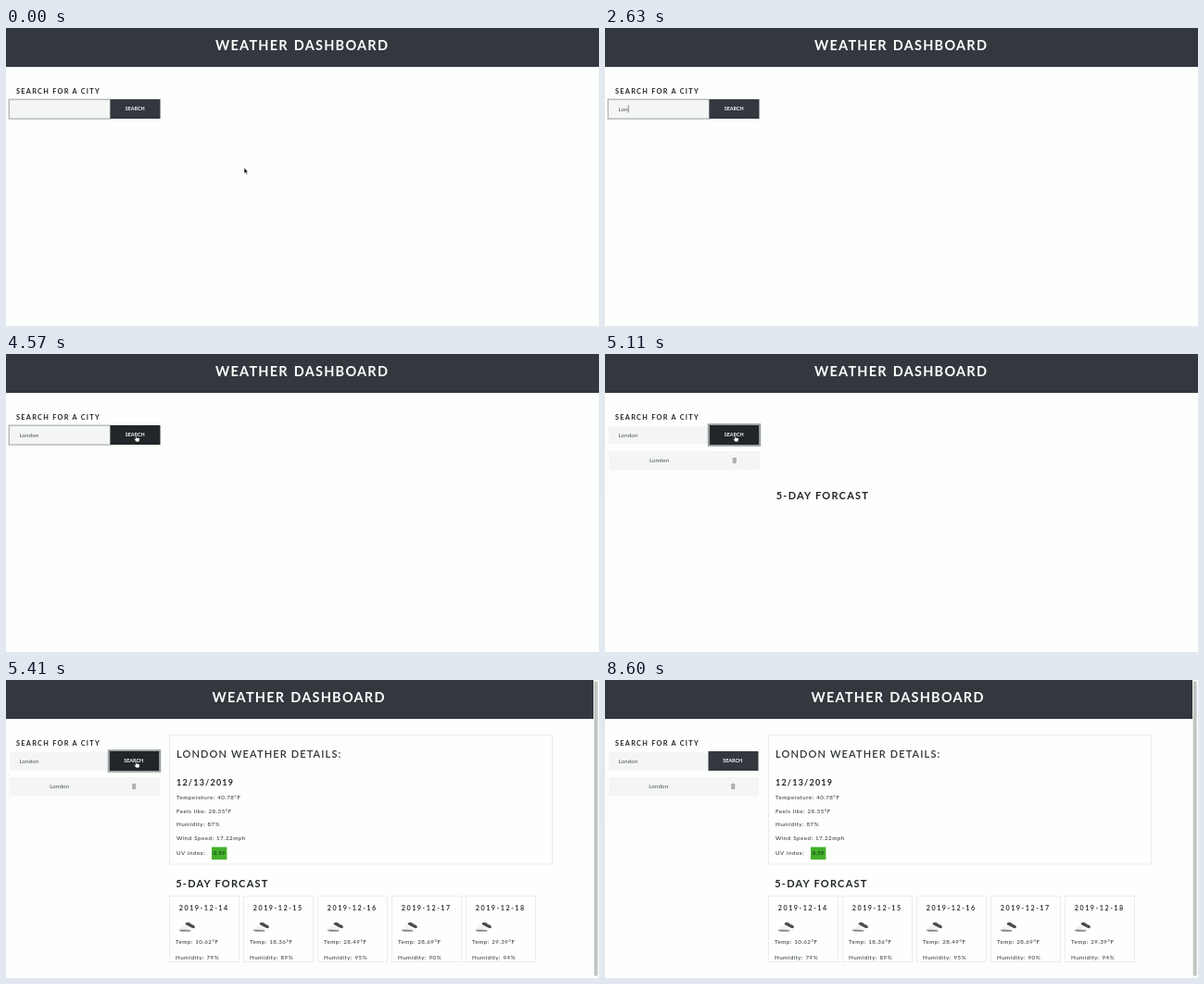
Recreate the animation shown at these times as an HTML page. Size 640 by 322 pixels, loop 9.05 s.

```html
<!DOCTYPE html>
<html lang="en">
<head>
<meta charset="utf-8">
<title>Weather dashboard</title>
<style>
  html, body { margin: 0; width: 100%; height: 100%; overflow: hidden; background: #fdfffc; }
  svg { display: block; width: 100vw; height: 100vh; font-family: Lato, "Open Sans", sans-serif; }
</style>
</head>
<body>
<svg id="stage" viewBox="0 0 640 322"></svg>
<script>
const LOOP = 9050;
const RESULTS = 5110, DETAILS = 5260, COMPLETE = 5410, HOVER = 4450, BLUR = 8420;
const CITY = "London";
const KEY_TIMES = [1570, 1950, 2280, 2770, 2910, 3040];
const CARET_ON = [[550, 840], [1060, 3400], [3900, 4190]];
const POINTER = [
  [0, "arrow", 257, 151], [290, "arrow", 120, 112], [420, "beam", 28.5, 84], [700, "none"],
  [4190, "arrow", 194, 107], [4320, "arrow", 172, 99], [4450, "hand", 144, 89],
  [4570, "hand", 138, 87.3], [6710, "hand", 138.5, 89.5], [6860, "arrow", 314, 56],
  [7000, "arrow", 539.7, -1], [8600, "none"]
];
const FORECAST = [["10.62", 79], ["18.36", 89], ["28.49", 95], ["28.69", 90], ["29.39", 94]];

const STYLES = {
  title:    { size: 14.5, spacing: 1.25, words: 1, weight: 700, fill: "#fff" },
  label:    { size: 7.3, spacing: 1.29, weight: 700, fill: "#212529" },
  button:   { size: 5.4, spacing: 0, weight: 700, fill: "#fff" },
  field:    { size: 6.2, spacing: 0.12, weight: 400, fill: "#495057" },
  heading:  { size: 11, spacing: 1.14, weight: 600, fill: "#303438" },
  forecast: { size: 11, spacing: 1.24, weight: 700, fill: "#212529" },
  date:     { size: 9, spacing: 1.2, weight: 700, fill: "#212529" },
  day:      { size: 7.2, spacing: 1.52, weight: 700, fill: "#33373b" },
  body:     { size: 6.2, spacing: 0.47, words: 0.5, weight: 500, fill: "#3a3e42" },
  badge:    { size: 6, spacing: 0.3, weight: 500, fill: "#14301a" }
};

const SHAPES = {
  none: "",
  arrow: `<path d="M0 0V6.2L1.5 4.9L2.5 7.3L3.6 6.8L2.6 4.5H4.4Z" fill="#111" stroke="#fff" stroke-width=".5"/>`,
  beam: `<path d="M0 .5Q1 .5 1 1.5V9.5Q1 10.5 0 10.5M2 .5Q1 .5 1 1.5M2 10.5Q1 10.5 1 9.5" fill="none" stroke="#555" stroke-width=".6"/>`,
  hand: `<path d="M1.7 4.8V1Q2.2 0 2.8 1V3L5.5 3.5Q6.5 3.8 6.3 5L5.6 7.6H2.5L.3 5Q.3 4 1.7 4.8Z" fill="#fff" stroke="#111" stroke-width=".55"/>`,
  trash: `<path d="M-2.2-2H2.2M-.8-2.2V-2.8H.8V-2.2M-1.6-1.8L-1.4 2.4H1.4L1.6-1.8M-.5-1V1.6M.5-1V1.6" fill="none" stroke="#555" stroke-width=".5"/>`,
  clouds: `<path d="M7.5 3Q7.5 .8 10 1.2Q12.5 .8 14 3Q17.5 3.6 17.8 6Q17.5 7.8 15 7.2L11 5.2Z" fill="#4c4c4c"/>
    <path d="M0 9.4Q0 7 3 7Q4 4 7 4.8Q10 4.2 11 6.6Q14 7.2 13.6 9.4Z" fill="#f1f1f1"/>
    <path d="M.3 9.2Q6 8.2 13.8 9.6L12.5 10.9H3Z" fill="#868686"/>`
};

const place = (name, x, y) => `<g transform="translate(${x} ${y})">${SHAPES[name]}</g>`;
const rect = (x, y, w, h, fill, extra = "") =>
  `<rect x="${x}" y="${y}" width="${w}" height="${h}" fill="${fill}" ${extra}/>`;
const outline = (x, y, w, h, color = "#e9ecea", width = 0.9) =>
  rect(x, y, w, h, "none", `stroke="${color}" stroke-width="${width}"`);

function text(style, x, y, content, id = "") {
  const s = STYLES[style];
  return `<text ${id && `id="${id}"`} x="${x}" y="${y}" font-size="${s.size}" font-weight="${s.weight}" fill="${s.fill}"
    letter-spacing="${s.spacing}" word-spacing="${s.words || 0}">${content}</text>`;
}

function header(complete) {
  return rect(0, 0, complete ? 634 : 640, 42, "#33383f") +
    text("title", complete ? 222.5 : 226, 23.8, "WEATHER DASHBOARD") +
    (complete ? rect(634.7, 1, 4, 319, "#c2c3c3", 'rx="2"') : "");
}

function searchPanel(t) {
  const results = t >= RESULTS, complete = t >= COMPLETE;
  const buttonX = complete ? 111.5 : 112.5, buttonWidth = 54;
  const buttonFocus = results && t < BLUR;
  const dark = t >= HOVER && t < BLUR;
  const typed = CITY.slice(0, KEY_TIMES.filter(k => t >= k).length);
  let out = text("label", 11, 71.3, "SEARCH FOR A CITY") + rect(4, 78, 108, 19.5, "#f4f5f5");
  if (!results) out += outline(3.3, 77.2, 109.4, 20.9, "#b9bcbd", 1.5);
  out += rect(buttonX, 77, buttonWidth, 21, dark ? "#212629" : "#33383f");
  if (buttonFocus) out += outline(buttonX - 0.8, 76.1, buttonWidth + 1.6, 22.8, "#9a9da0", 1.8);
  out += text("button", complete ? 127.2 : 128.8, 89.3, "SEARCH");
  out += text("field", 14.5, 89.6, typed, "typed");
  if (CARET_ON.some(([from, to]) => t >= from && t < to))
    out += rect(15, 83.5, 0.6, 8, "#444", 'id="caret"');
  if (results) {
    out += rect(4, 105, complete ? 162 : 163, 20.5, "#f4f5f5") + rect(2.3, 100, 0.5, 52, "#f3f4f3") +
      text("field", complete ? 47.2 : 48, 117.2, CITY) + place("trash", complete ? 138.2 : 139.8, 115.2);
  }
  return out;
}

function details(complete) {
  const rows = ["Temperature: 40.78°F", "Feels like: 28.35°F", "Humidity: 87%", "Wind Speed: 17.22mph"];
  return (complete ? outline(176.5, 59.5, 413, 139.5) : "") +
    text("heading", 184, 84, "LONDON WEATHER DETAILS:") +
    text("date", 184, 114.3, "12/13/2019") +
    rows.map((row, i) => text("body", 184, 129 + i * 14.7, row)).join("") +
    text("body", 184, 189.4, "UV index:") +
    rect(222, 180.5, 16.4, 13.5, "#43b02a") + text("badge", 223.8, 189.4, "0.59");
}

function forecastCards(complete) {
  const lift = complete ? 0 : 21; // rows sit higher until the icons load
  return FORECAST.map(([temp, humidity], i) => {
    const x = 176.5 + i * 80;
    return (complete ? outline(x, 233.5, 75, 71) + place("clouds", x + 9.6, 260.9) : "") +
      text("day", x + 10.3, 248.7, `2019-12-${14 + i}`) +
      text("body", x + 6.5, 285.2 - lift, `Temp: ${temp}°F`) +
      text("body", x + 6.5, 301.6 - lift, `Humidity: ${humidity}%`);
  }).join("");
}

function results(t) {
  if (t < RESULTS) return "";
  if (t < DETAILS) return text("forecast", 184.7, 156.8, "5-DAY FORCAST");
  const complete = t >= COMPLETE;
  return `<g transform="translate(${complete ? 0 : 1.5} 0)">` + details(complete) +
    text("forecast", 183.2, 223.8, "5-DAY FORCAST") + forecastCards(complete) + "</g>";
}

function pointer(t) {
  const [, shape, x = 0, y = 0] = POINTER.findLast(([start]) => t >= start);
  return place(shape, x, y);
}

const stage = document.getElementById("stage");
let shown = "";

function draw(t) {
  const markup = header(t >= COMPLETE) + searchPanel(t) + results(t) + pointer(t);
  if (markup === shown) return;
  stage.innerHTML = shown = markup;
  const caret = document.getElementById("caret");
  if (caret) caret.setAttribute("x", 14.6 + document.getElementById("typed").getComputedTextLength());
}

const start = performance.now();
function frame() {
  draw((performance.now() - start) % LOOP);
  requestAnimationFrame(frame);
}
frame();
</script>
</body>
</html>
```
